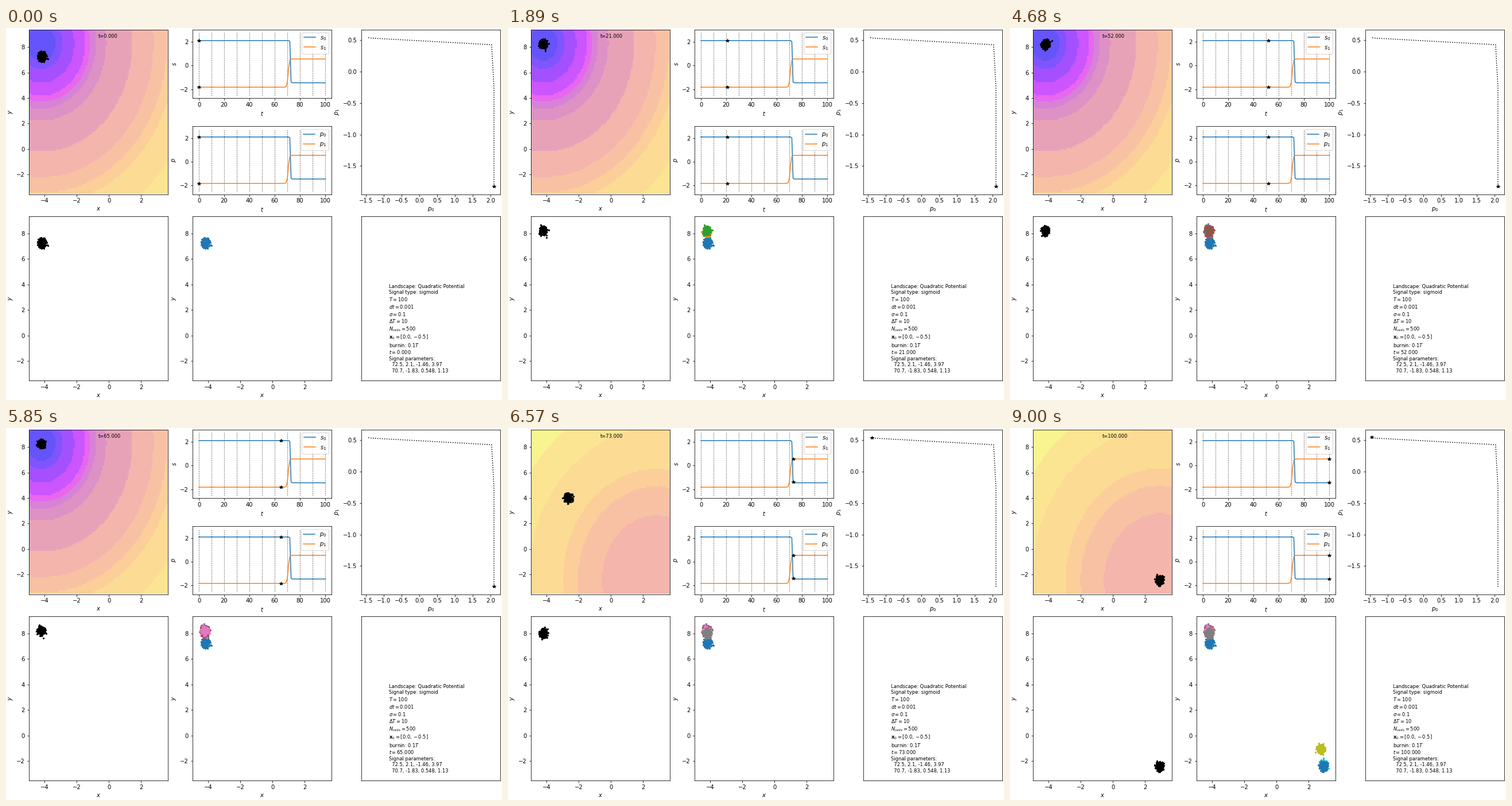
A matplotlib script for the animation above (9.09 s loop, 864 by 648 pixels).

```python
import numpy as np
import matplotlib.pyplot as plt
from matplotlib.animation import FuncAnimation
from matplotlib.colors import BoundaryNorm, ListedColormap

W, H, DPI = 864, 648, 72
T, DT, SIGMA, N_CELLS = 100, 0.01, 0.1, 500
SAVE_EVERY = 10
BURN_IN = 10
START = (0.0, -0.5)
XLIM, YLIM = (-4.97, 3.66), (-3.54, 9.36)

# Sigmoid signals: switch time, start value, end value, rate
T_SWITCH = np.array([72.5, 70.7])
P_START = np.array([2.1, -1.83])
P_END = np.array([-1.46, 0.548])
RATE = np.array([3.97, 1.13])

# Quadratic potential: x^2/4 + y^2/9 + p.x
STIFFNESS = np.array([1 / 2, 2 / 9])

LEVELS = [-11.75, -11.51, -10.9, -10.1, -9.65, -9.07, -7.9,
          -4.0, 0.2, 3.25, 5.7, 13.0, 20.5]
BAND_COLORS = ["#6454fa", "#8054ff", "#a450ff", "#cb55ff", "#e866f0",
               "#d782d7", "#de91c4", "#e8a2b8", "#f4b5ac", "#f8c1a4",
               "#fbce9a", "#fcdb94", "#fbe592", "#f8f591"]


def signal(t):
    return P_START + (P_END - P_START) / 2 * (1 + np.tanh(RATE * (t - T_SWITCH)))


def simulate():
    """Cell positions at t = 0, 1, ..., T after the burn-in."""
    rng = np.random.default_rng(7)
    per_unit = round(1 / DT)
    cells = np.tile(START, (N_CELLS, 1))
    kick = SIGMA * np.sqrt(DT)
    saved = []
    for step in range((BURN_IN + T) * per_unit + 1):
        t = step * DT - BURN_IN
        if step % per_unit == 0 and step >= BURN_IN * per_unit:
            saved.append(cells)
        drift = -(STIFFNESS * cells + signal(max(t, 0)))
        cells = cells + drift * DT + kick * rng.standard_normal(cells.shape)
    return saved


def cell_centres(lo, hi, n=100):
    edges = np.linspace(lo, hi, n + 1)
    return (edges[1:] + edges[:-1]) / 2


GX, GY = np.meshgrid(cell_centres(*XLIM), cell_centres(*YLIM))


def potential(t):
    p0, p1 = signal(t)
    return GX**2 / 4 + GY**2 / 9 + p0 * GX + p1 * GY


times = np.arange(T + 1)
signals = np.array([signal(t) for t in times])
cells = simulate()

fig = plt.figure(figsize=(W / DPI, H / DPI), dpi=DPI, facecolor="white")


def add_axes(left, top, right, bottom):
    return fig.add_axes([left / W, 1 - bottom / H,
                         (right - left) / W, (bottom - top) / H])


def plane_axes(left, top, right, bottom):
    ax = add_axes(left, top, right, bottom)
    ax.set(xlim=XLIM, ylim=YLIM, xlabel="$x$", ylabel="$y$",
           xticks=range(-4, 3, 2), yticks=range(-2, 9, 2))
    return ax


def signal_axes(top, bottom, name):
    ax = add_axes(325, top, 567, bottom)
    mid = (P_START[0] + P_START[1]) / 2
    ax.vlines(range(0, T + 1, SAVE_EVERY), mid - 2.62, mid + 2.62,
              colors="k", linestyles=":", linewidth=1.2, alpha=0.7)
    for i in range(2):
        ax.plot(times, signals[:, i], label=f"${name}_{i}$")
    ax.set(xlim=(-5, 105), ylim=(mid - 2.88, mid + 2.88),
           xlabel="$t$", ylabel=f"${name}$",
           xticks=range(0, 101, 20), yticks=(-2, 0, 2))
    ax.legend(loc="upper right")
    return ax


def dots(ax, color):
    return ax.plot([], [], "o", color=color, ms=3.2, mew=0)[0]


def star(ax):
    return ax.plot([], [], "k*", ms=6, zorder=5)[0]


# Landscape with live cells
land_ax = plane_axes(40, 3, 281.5, 289.5)
heat = land_ax.imshow(potential(0), extent=(*XLIM, *YLIM), origin="lower",
                      aspect="auto", interpolation="nearest",
                      cmap=ListedColormap(BAND_COLORS),
                      norm=BoundaryNorm([-100] + LEVELS + [100], len(BAND_COLORS)))
live = dots(land_ax, "k")
clock = land_ax.text(0.5, 0.95, "", fontsize="small", transform=land_ax.transAxes)

# Latest snapshot, and all snapshots so far
last = dots(plane_axes(40, 328, 281.5, 614), "k")
history_ax = plane_axes(325, 328, 567, 614)
history = [dots(history_ax, f"C{i % 10}") for i in range(T // SAVE_EVERY + 1)]

# Signals and parameter path
time_stars = [star(ax) for ax in (signal_axes(3, 122, "s"),
                                  signal_axes(171, 289.5, "p"))]
path_ax = add_axes(618.5, 3, 861, 289.5)
path_ax.plot(*signals.T, "k:")
path_ax.set(xlabel="$p_0$", ylabel="$p_1$",
            xticks=np.arange(-1.5, 2.1, 0.5), yticks=np.arange(-1.5, 0.6, 0.5))
path_ax.set(xlim=(-1.638, 2.278), ylim=(-1.949, 0.667))
path_star = star(path_ax)

# Run description
info_ax = add_axes(618.5, 328, 861, 614)
info_ax.set(xticks=[], yticks=[])
info = info_ax.text(0.2, 0.05, "", fontsize="small", transform=info_ax.transAxes)


def describe(t):
    return "\n".join([
        "Landscape: Quadratic Potential",
        "Signal type: sigmoid",
        "$T=100$",
        "$dt=0.001$",
        r"$\sigma=0.1$",
        r"$\Delta T=10$",
        "$N_{cells}=500$",
        r"$\mathbf{x}_0=[0.0, -0.5]$",
        "burnin: $0.1T$",
        f"$t={t:.3f}$",
        "Signal parameters:",
        "  72.5, 2.1, -1.46, 3.97",
        "  70.7, -1.83, 0.548, 1.13",
    ])


def update(t):
    heat.set_data(potential(t))
    live.set_data(*cells[t].T)
    clock.set_text(f"t={t:.3f}")

    latest = t // SAVE_EVERY
    last.set_data(*cells[latest * SAVE_EVERY].T)
    for i, snapshot in enumerate(history):
        snapshot.set_data(*cells[i * SAVE_EVERY].T)
        snapshot.set_visible(i <= latest)

    for mark in time_stars:
        mark.set_data([t, t], signals[t])
    path_star.set_data(signals[t, :1], signals[t, 1:])
    info.set_text(describe(t))
    return []


anim = FuncAnimation(fig, update, frames=T + 1, interval=90,
                     repeat=True, repeat_delay=0)
plt.show()
```
